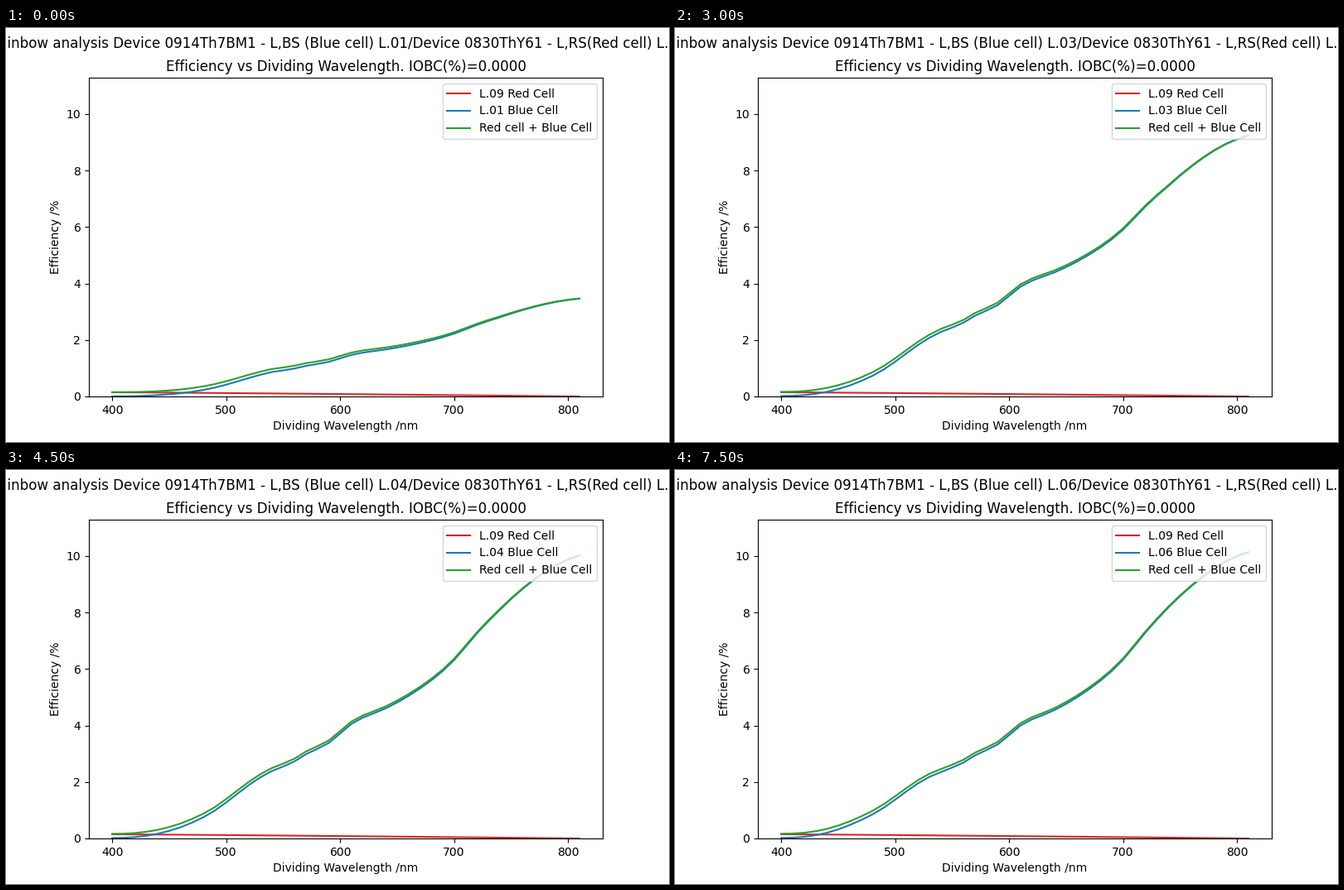
Write a matplotlib script that moves like this. It is 800 px wide and 500 px high and loops after 8 s.

```python
import numpy as np
import matplotlib.pyplot as plt
from matplotlib.animation import FuncAnimation

plt.rcParams["font.family"] = "DejaVu Sans"
plt.rcParams["text.hinting_factor"] = 64  # near-unrounded glyph advances

INTERVAL = 500
FRAMES = 16
HOLD = 3  # ticks each cell stays on screen

# Key points of the response shared by all blue cells: wavelength, efficiency
SHAPE = [(400, .02), (440, .2), (480, .85), (530, 2.18), (550, 2.51), (560, 2.69),
         (570, 2.94), (590, 3.33), (610, 4.0), (640, 4.55), (660, 5.01), (700, 6.33),
         (720, 7.31), (750, 8.58), (800, 10.0), (810, 10.14)]

# Gain of each blue cell at its onset, middle and tail
GAINS = [(.24, .368, .342), (.62, .776, .708), (.82, .972, .911),
         (.84, 1.015, .988), (.955, 1.008, 1.029), (1, 1, 1)]


def hermite(x, kx, ky):
    """Cubic curve through the key points, flat at the start."""
    slope = np.gradient(ky, kx)
    slope[0] = 0
    i = np.clip(np.searchsorted(kx, x, side="right") - 1, 0, len(kx) - 2)
    h = kx[i + 1] - kx[i]
    t = (x - kx[i]) / h
    return ((1 + 2 * t) * (1 - t) ** 2 * ky[i] + t * (1 - t) ** 2 * h * slope[i]
            + t * t * (3 - 2 * t) * ky[i + 1] + t * t * (t - 1) * h * slope[i + 1])


def blue_cell(k):
    onset, middle, tail = GAINS[k]
    return shape * np.interp(wave, [460, 540, 630, 740], [onset, middle, middle, tail])


wave = np.arange(400, 811, 10.0)
shape = hermite(wave, *np.array(SHAPE, float).T)
red = .147 * (1 - ((wave - 400) / 410) ** 1.2)

fig, ax = plt.subplots(figsize=(8, 5), dpi=100)
ax.plot(wave, red, color="tab:red", label="L.09 Red Cell")
blue_line, = ax.plot(wave, shape, color="tab:blue", label="L.01 Blue Cell")
sum_line, = ax.plot(wave, shape + red, color="tab:green", label="Red cell + Blue Cell")
ax.set_xlim(379.5, 830.5)
ax.set_ylim(0, 11.29)
ax.set_xlabel("Dividing Wavelength /nm")
ax.set_ylabel("Efficiency /%")
ax.set_title("Efficiency vs Dividing Wavelength. IOBC(%)=0.0000")
blue_label = ax.legend(loc="upper right").get_texts()[1]
heading = fig.suptitle("")


def update(frame):
    k = frame // HOLD
    cell = f"L.{k + 1:02d}"
    blue = blue_cell(k)
    blue_line.set_ydata(blue)
    sum_line.set_ydata(blue + red)
    blue_label.set_text(f"{cell} Blue Cell")
    heading.set_text(f"Rainbow analysis Device 0914Th7BM1 - L,BS (Blue cell) {cell}"
                     "/Device 0830ThY61 - L,RS(Red cell) L.09")
    return blue_line, sum_line, blue_label, heading


anim = FuncAnimation(fig, update, frames=FRAMES, init_func=lambda: update(0),
                     interval=INTERVAL, repeat=True, repeat_delay=0, blit=False)
plt.show()
```
